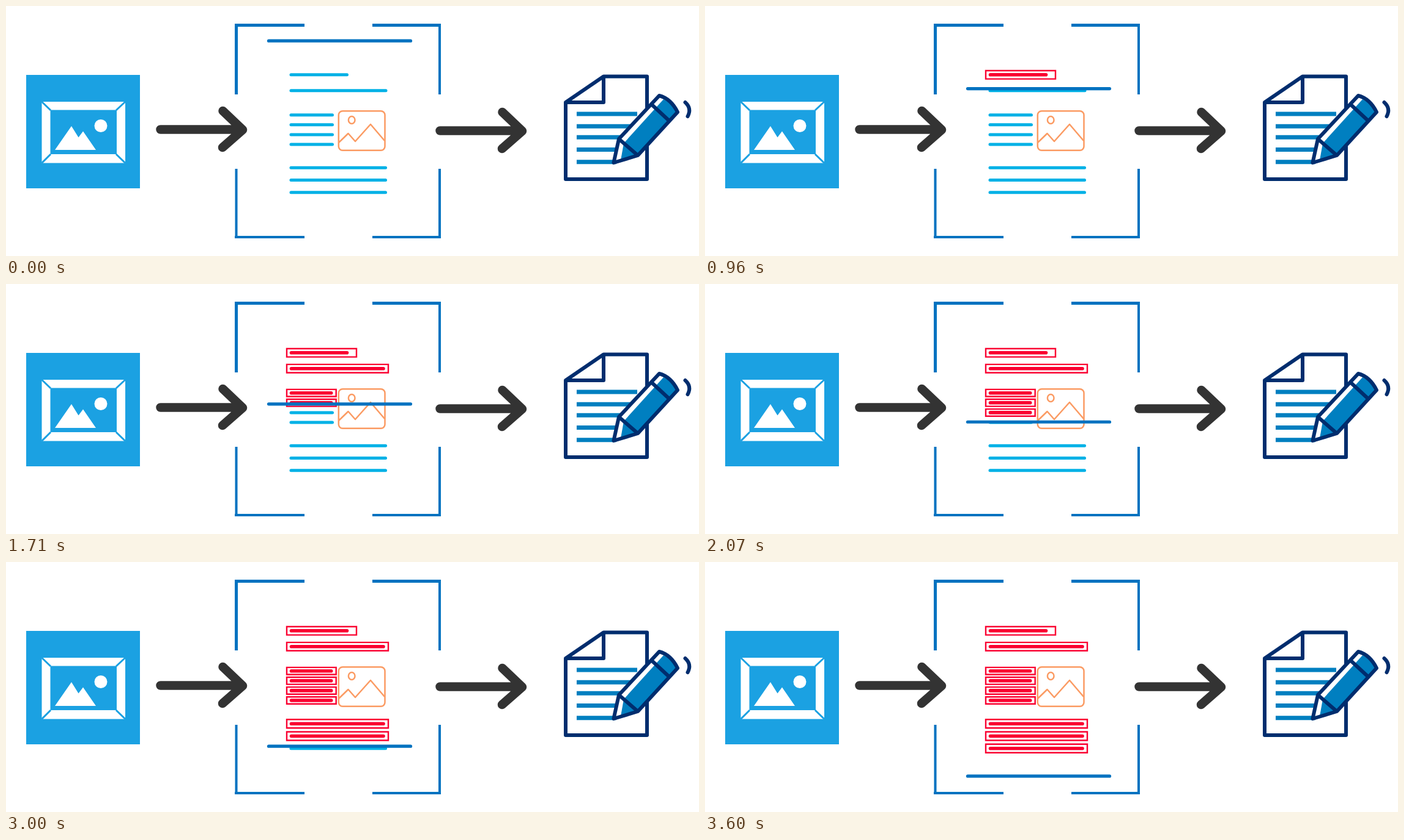
An HTML page for the animation above (3.97 s loop, 1133 by 410 pixels).

```html
<!DOCTYPE html>
<html>
<head>
<meta charset="utf-8">
<style>
html, body { margin: 0; width: 100%; height: 100%; overflow: hidden; background: #fff; }
svg { display: block; }
</style>
</head>
<body>
<svg width="1133" height="410" viewBox="0 0 1133 410" fill="none">
  <defs>
    <path id="arrow" d="M252.5 202.5H384M354.5 172L387 203L354 232" stroke="#333" stroke-width="14.5" stroke-linecap="round" stroke-linejoin="round"/>
  </defs>

  <!-- framed picture -->
  <path fill="#1ba1e2" d="M33 113H219V299H33Z"/>
  <path fill="#fff" fill-rule="evenodd" d="M58.5 157H195V257.5H58.5ZM72.5 170.5V243H181V170.5Z"/>
  <path stroke="#1ba1e2" stroke-width="3" d="M58.5 157L73 171M195 157L180 171M58.5 257.5L73 243M195 257.5L180 243"/>
  <path fill="#fff" d="M80 236L107 197L118.5 215.5L126 205.5L147 236Z"/>
  <circle fill="#fff" cx="155" cy="196.5" r="10.5"/>

  <use href="#arrow"/>
  <use href="#arrow" x="457" y="2"/>

  <!-- scanner -->
  <g stroke="#0072c0">
    <path stroke-width="5" d="M488 31.5H376.5V145M599 31.5H711"/>
    <path stroke-width="4" d="M709 29V145M488 379H374M376.5 267V381M599 379H709V267"/>
  </g>
  <g id="rows"></g>
  <g stroke="#fb9b63" stroke-width="2.5" stroke-linejoin="round">
    <rect x="543.8" y="172.2" width="75.7" height="64.5" rx="6.5"/>
    <ellipse cx="565.2" cy="187" rx="5.3" ry="6"/>
    <path d="M544 224L559.5 209L571 222L596 194L619 221"/>
  </g>
  <path id="scan" stroke="#0072c0" stroke-width="5.2" stroke-linecap="round" d="M429.5 0H661.5"/>

  <!-- document and pencil -->
  <g stroke="#002d6e" stroke-width="6" stroke-linejoin="round">
    <path d="M915 158L977 115.5H1048V284H915ZM915 158H977V115.5"/>
    <path stroke="#007fc0" stroke-width="7" d="M933 177H1032M933 197.3H1030M933 215.3H1010M933 235.5H1005M933 255.7H998"/>
    <path fill="#fff" stroke="none" d="M1002 218L1068 147Q1087 152 1098 174L1033 245L993.5 257Z"/>
    <path fill="#007fc0" stroke="none" d="M1010 225L1075 153Q1090 159 1098 174L1033 245L1005 253Z"/>
    <path d="M1002 218L1068 147Q1087 152 1098 174L1033 245L993.5 257ZM1055 161L1084 188M1002 218L1033 245"/>
    <path stroke-linecap="round" d="M1110.5 158Q1121.5 168 1114.5 181"/>
  </g>
</svg>
<script>
const LOOP = 3970, SCAN = 3600, STEP = 30, TOP = 57.2, BOTTOM = 351.2;
const BOX_LEFT = 459, TEXT_LEFT = 466;

const group = document.getElementById("rows");
const scan = document.getElementById("scan");
const rows = [];

// Evenly spaced lines of text, each with a red box that appears once scanned
function addRows(count, top, gap, textRight, boxRight, halfHeight) {
  for (let i = 0; i < count; i++) {
    const y = top + i * gap;
    group.insertAdjacentHTML("beforeend", `
      <path stroke="#00b1e6" stroke-width="5" stroke-linecap="round" d="M${TEXT_LEFT} ${y}H${textRight}"/>
      <g stroke="#fa0030">
        <path fill="#fff" stroke-width="2.4" d="M${BOX_LEFT} ${y - halfHeight}H${boxRight}v${2 * halfHeight}H${BOX_LEFT}Z"/>
        <path stroke-width="5.6" stroke-linecap="round" d="M${TEXT_LEFT + 0.5} ${y}H${Math.min(textRight, boxRight - 8)}"/>
      </g>`);
    rows.push({ y, mark: group.lastElementChild });
  }
}
addRows(1, 112.8, 0, 557.5, 573, 6.8);
addRows(1, 138.7, 0, 621, 625, 6.8);
addRows(4, 178.7, 16.1, 533.5, 539.7, 5.8);
addRows(3, 265.3, 20.2, 620.5, 625, 7);

function draw(now) {
  const time = Math.min(Math.floor((now % LOOP) / STEP) * STEP, SCAN);
  const scanY = TOP + (BOTTOM - TOP) * time / SCAN;
  scan.setAttribute("transform", `translate(0 ${scanY})`);
  for (const { y, mark } of rows) mark.setAttribute("visibility", scanY >= y ? "visible" : "hidden");
  requestAnimationFrame(draw);
}
draw(performance.now());
</script>
</body>
</html>
```
